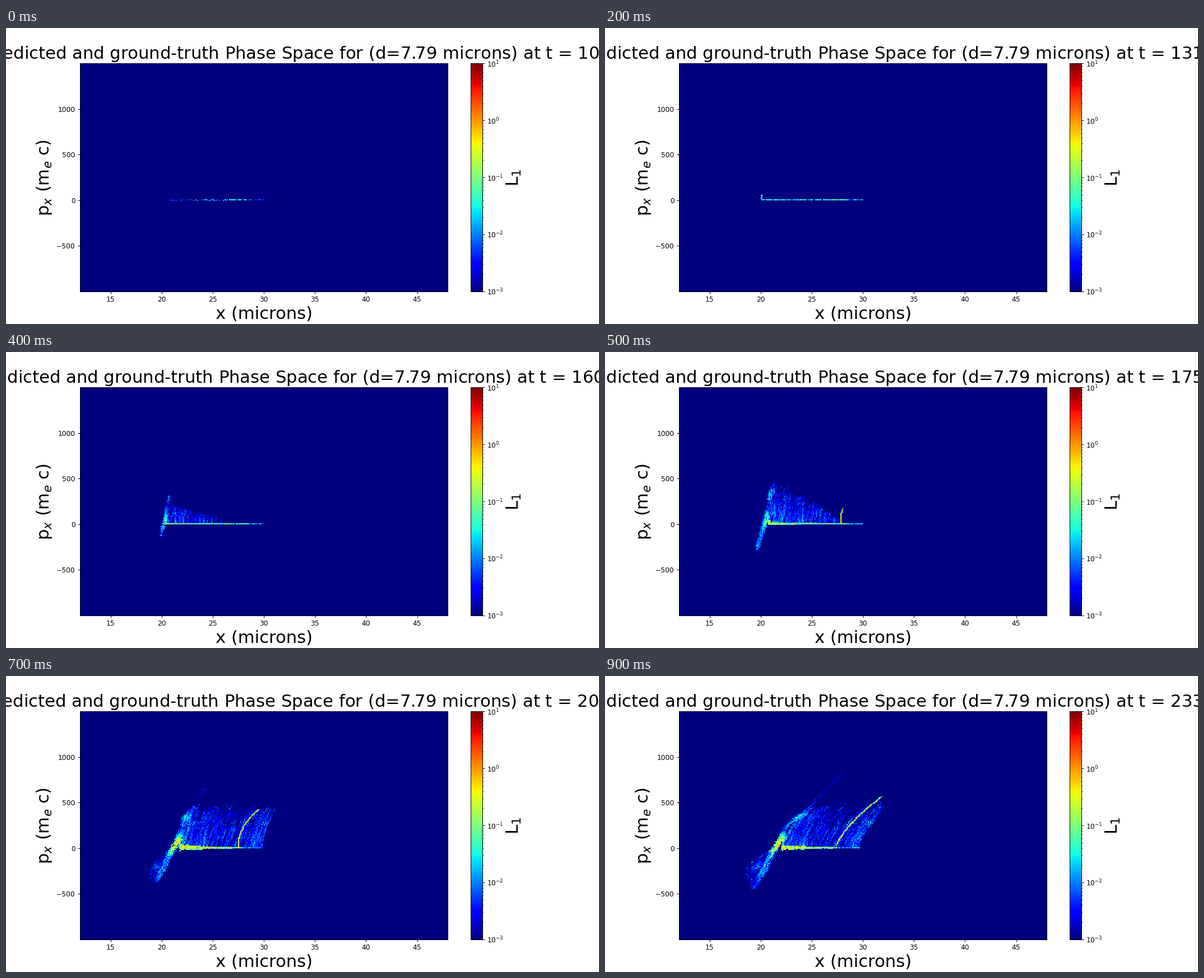
Animation, 1058 px wide and 529 px high, one loop 1 s. Source, as a matplotlib script:

```python
import numpy as np
import matplotlib.pyplot as plt
from matplotlib.animation import FuncAnimation
from matplotlib.colors import LogNorm

FRAMES, INTERVAL = 10, 100
NX, NP = 360, 250
X0, X1, P0, P1 = 12, 48, -1000, 1500
FLOOR = -3.0  # log10 of the lowest colour

X, P = np.meshgrid(X0 + (np.arange(NX) + 0.5) * (X1 - X0) / NX,
                   P0 + (np.arange(NP) + 0.5) * (P1 - P0) / NP)

# Long-lived streak texture, carried along by the flow.
STREAKS = np.random.default_rng(7).normal(0, 1, (NX, 32))


def bump(v, centre, width):
    return np.exp(-((v - centre) / width) ** 2)


def streak(u, p):
    """Texture that is long in p and fine in u."""
    i = np.floor(u * 10).astype(int) % NX
    q = (p - P0) / 80
    j = np.clip(np.floor(q).astype(int), 0, 30)
    f = q - j
    return STREAKS[i, j] * (1 - f) + STREAKS[i, j + 1] * f


def put(grid, mask, value):
    grid[mask] = np.maximum(grid, value)[mask]


class Stage:
    """Progress of the interaction at step k."""

    def __init__(self, k):
        self.k = k
        self.heat = min(k / 6, 1)
        self.grow = np.clip((k - 1) / 4, 0, 1)   # electrons lifted forward
        self.fall = np.clip((k - 3) / 2, 0, 1)   # electrons pulled backward
        self.late = np.clip((k - 5) / 4, 0, 1)   # free expansion
        self.ease = self.late * (2 - self.late)
        self.spine_x, self.spine_p = self.spine()
        knee = np.interp(90 * self.grow, self.spine_p, self.spine_x)
        self.left = 20.6 if k < 2 else knee
        self.right = 30 - 0.3 * self.late

    def spine(self):
        """Tilted front of fast electrons, from lower to upper tip."""
        u, e = self.late, self.ease
        x = np.array([19.6, 20.3, 20.65, 20.8, 20.95, 21.5])
        p = np.array([-290.0, -20, 90, 220, 335, 510])
        x += [-0.2 * u, 0.95 * e, 1.35 * e, 1.6 * e, 3 * u, u * (4.7 + 2 * u)]
        p += [-160 * u, 0, 0, 10 * u, 15 * u, 330 * u]
        x = 20.1 + (x - 20.1) * self.fall
        return x, p * np.where(p < 0, self.fall, self.grow ** 1.6)


def draw_fan(grid, rng, s):
    lean = 0.6 * s.grow + 1.6 * s.late ** 1.5
    foot = X - lean * (np.maximum(P, 0) / 400) ** 1.5
    front = 28 + (s.k - 5) * (1.5 if s.k < 5 else 8)
    height = 430 * s.grow ** 2 + 25 * s.late
    top = height * np.clip((front - foot) / 7.5, 0, 1) ** 0.7
    rise = P / np.maximum(top, 1)
    level = (-2.45 - 0.4 * (1 - s.grow) - 0.3 * rise
             + 0.35 * np.exp(-np.maximum(foot - s.left, 0) / 2)
             + s.ease * (0.25 * bump(foot, 29.3, 1)
                         - 0.25 * bump(foot, 25.8, 1.5)))
    level += 0.33 * streak(foot, P) + 0.14 * rng.normal(size=X.shape)
    reach = 1 + 0.1 * streak(foot, P * 0)
    keep = rng.random(X.shape) < 0.97 - 0.3 * rise ** 2
    put(grid, (P > 0) & (rise < reach) & (foot > s.left)
        & (foot < s.right) & keep, level)


def draw_spine(grid, rng, s):
    low, high = s.spine_p[0], s.spine_p[-1]
    d = X - np.interp(P, s.spine_p, s.spine_x)
    along = np.where(P > 0, P / high, P / min(low, -1))
    elbow = bump(P, 340, 80)
    width = 0.06 + s.fall * (0.24 * (1 - 0.8 * along ** 2 * (1 - s.late))
                             + 0.2 * s.late * elbow)
    rel = (d / width) ** 2
    peak = 1.2 + min(1, 2 * s.late)
    level = (-2.6 + peak * bump(P, 50, 120) + 0.9 * elbow
             + 0.9 * bump(P, -240, 160) - 0.35 * s.late * (along > 0.7)
             - 0.6 * rel + 0.25 * streak(d + 20, P)
             + 0.25 * rng.normal(size=X.shape))
    keep = rng.random(X.shape) < 1 - 0.3 * rel
    put(grid, (P > low) & (P < high) & (rel < 1 + 1.5 * s.fall) & keep, level)

    if s.fall == 1:
        draw_wing(grid, rng, s, d)


def draw_wing(grid, rng, s, d):
    """Haze trailing behind the front, with a brighter outer edge."""
    reach = (0.2 + 1.6 * s.late ** 0.6) * bump(P, -220, 170)
    depth = 1 + d / np.maximum(reach, 0.05)
    level = (-2.7 + 0.5 * depth + 0.3 * streak(d + 20, P)
             + 0.15 * rng.normal(size=X.shape))
    level += 0.4 * ((d + reach) < 0.12) * (P > -170)
    keep = rng.random(X.shape) < 0.6 + 0.4 * depth
    put(grid, (P > s.spine_p[0]) & (P < 120) & (depth > 0) & (d < 0) & keep,
        level)


def draw_line(grid, rng, s):
    """Flat target layer, heated and thickened from its left end."""
    t = np.clip((X - s.left) / (s.right - s.left), 0, 1)
    body = -2.2 + 1.75 * s.heat + (0.8 - 1.6 * s.heat) * t
    level = np.where(X < 28.6 - 1.1 * s.late, body, -2.2 + 0.3 * s.heat)
    half = 5 + 20 * (1 - t) ** 1.5 * np.clip((s.k - 4) / 2, 0, 1.3)
    curl = 8 * (1 - s.late) * (s.fall == 1) / (X - s.left + 0.08)
    half += np.clip(curl, 0, 90) * (P > 0) * (X > s.left)
    jitter = rng.random(X.shape[1]) < 0.5
    centre = np.where((s.k < 2) & (X < 26.6) & jitter, -5, 5)
    rel = np.abs(P - centre) / half
    level += (-0.6 * rel ** 2 * (half > 6)
              + 0.35 * rng.normal(size=X.shape))
    gap = rng.random(X.shape[1]) < 0.2 - 0.07 * s.k
    keep = rng.random(X.shape) < 1.2 - 0.5 * rel
    put(grid, (rel < 1) & (X > s.left) & (X < s.right) & keep & ~gap, level)


def draw_arc(grid, rng, s):
    """Bright filament leaving the rear side."""
    t = np.linspace(0, 1, 600)
    x = (27.8 - 0.4 * s.ease
         + (0.25 + 4.15 * s.late ** 1.2) * t ** (3.1 - 1.6 * s.late))
    p = (170 + 390 * s.late ** 0.6) * t
    i = ((x - X0) / (X1 - X0) * NX).astype(int)
    j = ((p - P0) / (P1 - P0) * NP).astype(int)
    level = -0.9 - 0.4 * t ** 3 + 0.25 * rng.normal(size=t.size)
    np.maximum.at(grid, (j, i), level)


def density(k):
    s = Stage(k)
    rng = np.random.default_rng(40 + k)
    grid = np.full((NP, NX), FLOOR)
    if s.grow > 0:
        draw_fan(grid, rng, s)
        draw_spine(grid, rng, s)
    draw_line(grid, rng, s)
    if s.fall == 1:
        draw_arc(grid, rng, s)
    return 10 ** np.clip(grid, FLOOR, 1)


fig, ax = plt.subplots(figsize=(12, 6), dpi=88.17)
image = ax.imshow(density(0), extent=(X0, X1, P0, P1), origin="lower",
                  aspect="auto", interpolation="nearest", cmap="jet",
                  norm=LogNorm(1e-3, 10))
ax.set_xticks(range(15, 46, 5))
ax.set_yticks(range(-500, 1001, 500))
ax.set_xlabel("x (microns)", fontsize=25)
ax.set_ylabel("p$_x$ (m$_e$ c)", fontsize=25)
bar = fig.colorbar(image, ax=ax)
bar.set_label("L$_1$", fontsize=25, labelpad=2.5)
title = ax.set_title("", fontsize=25)


def update(k):
    image.set_data(density(k))
    time = round(102.2 + 102.1 * k / 7, 2)
    title.set_text("L$_1$ between predicted and ground-truth Phase Space "
                   f"for (d=7.79 microns) at t = {time} fs")
    return image, title


anim = FuncAnimation(fig, update, frames=FRAMES, interval=INTERVAL,
                     repeat=True, repeat_delay=0, blit=False)
plt.show()
```
